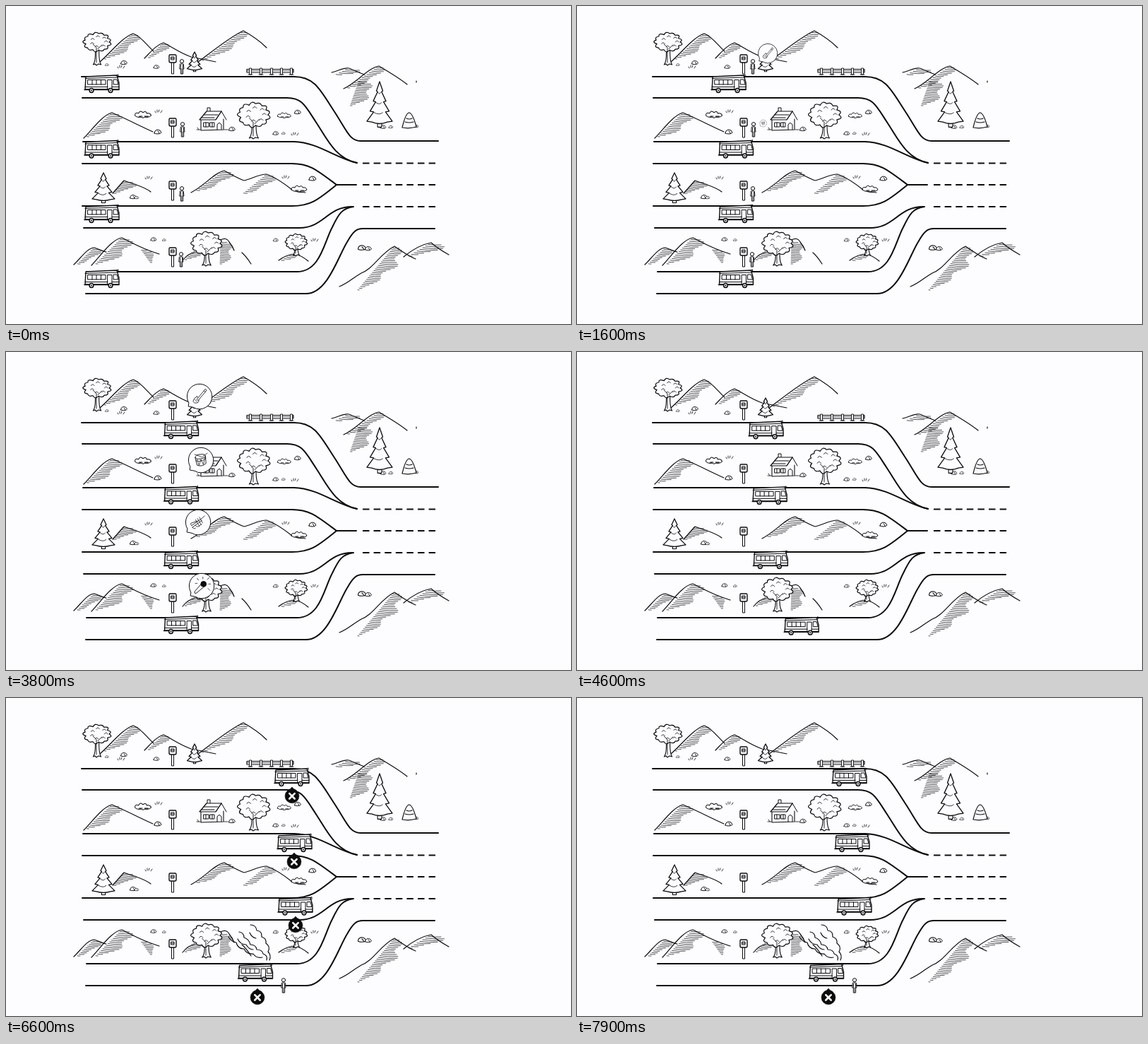
An HTML page with a canvas for the animation above (8 s loop, 800 by 450 pixels).

```html
<!DOCTYPE html>
<html lang="en">
<head>
<meta charset="utf-8">
<title>Four buses</title>
<style>
html, body { margin: 0; width: 100%; height: 100%; overflow: hidden; background: #fdfcff; }
canvas { display: block; }
</style>
</head>
<body>
<canvas id="stage" width="800" height="450"></canvas>
<script>
const g = document.getElementById('stage').getContext('2d');
const PAPER = '#fdfcff', INK = '#0c0c0c', LOOP = 8000;

const clamp = u => Math.max(0, Math.min(1, u));
const mix = (a, b, u) => a + (b - a) * u;
const span = (t, from, length) => clamp((t - from) / length);
const easeOut = u => 1 - (1 - u) ** 2;
const easeInOut = u => u < .5 ? 2 * u * u : 1 - 2 * (1 - u) ** 2;

function ink(d, width = 1, fill) {
  const path = new Path2D(d);
  if (fill) { g.fillStyle = fill; g.fill(path); }
  g.lineWidth = width;
  g.stroke(path);
}
function at(x, y, scale, draw) {
  if (scale <= 0) return;
  g.save();
  g.translate(x, y);
  g.scale(scale, scale);
  draw();
  g.restore();
}
function disc(x, y, r, fill, width = 1) {
  g.beginPath();
  g.arc(x, y, r, 0, 7);
  g.fillStyle = fill;
  g.fill();
  g.lineWidth = width;
  g.stroke();
}

// Scenery
function shade(x, y, footX, footY, w) {
  const n = Math.round((footY - y) / 2.5);
  let d = '';
  for (let i = 1; i <= n; i++) {
    const u = i / (n + .5);
    const len = w * Math.sin(Math.PI * u ** .8) ** .7 * (.78 + .22 * Math.sin(i * 7));
    d += `M${mix(x, footX, u)} ${mix(y, footY, u)}q${len / 2} ${len * .08} ${len} ${len * .04}`;
  }
  ink(d, .7);
}
function tree(x, y, rx, ry, base) {
  const k = rx / 20, top = y + ry * .5;
  ink(`M${x - 3 * k} ${top}Q${x - 1.5 * k} ${base - 5} ${x - 6 * k} ${base}l${3 * k} -1l${2 * k} 2l${3 * k} -2l${4 * k} 1Q${x + 2 * k} ${base - 5} ${x + 3 * k} ${top}`, 1.1, PAPER);
  const n = 13;
  const spot = (i, r) => {
    const a = i / n * 2 * Math.PI, f = r * (1 + .05 * Math.sin(i * 4));
    return `${x + rx * f * Math.cos(a)} ${y + ry * f * Math.sin(a)}`;
  };
  let d = 'M' + spot(0, .9);
  for (let i = 1; i < n; i++) d += `Q${spot(i - .5, 1.22)} ${spot(i, .9)}`;
  ink(d + `Q${spot(n - .5, 1.22)} ${spot(0, .9)}Z`, 1.2, PAPER);
  for (let i = 0; i < 7; i++) ink(`M${spot(i * 1.9, .55)}q${2 * k} ${-4 * k} ${5 * k} 0`, .8);
  ink(`M${x - 1} ${base - 3}L${x - 1} ${y + ry * .6}l${-5 * k} ${-5 * k}M${x + 1} ${y + ry * .75}l${6 * k} ${-6 * k}`, .9);
}
function pine(x, y, w, h) {
  ink(`M${x - w * .08} ${y + h * .85}v${h * .14}h${w * .16}v${-h * .14}`, 1.1, PAPER);
  const left = [], right = [];
  for (let i = 1; i <= 4; i++) {
    const half = w * i / 8, level = y + h * .88 * i / 4;
    for (const [f, lift] of [[1, 1], [.62, 0]]) {
      left.push(`${x - half * f} ${level - lift}`);
      right.unshift(`${x + half * f} ${level - lift}`);
    }
  }
  ink(`M${x} ${y}L${left.join('L')}Q${x} ${y + h * .95} ${right.join('L')}Z`, 1.3, PAPER);
  for (let i = 1; i < 4; i++) ink(`M${x - w * i / 14} ${y + h * .22 * i + 1}q${w * i / 14} 4 ${w * i / 9} 0`, .8);
}
function rock(x, y, w) {
  at(x, y, w / 10, () => ink('M-5 2Q-5-2-1-3Q4-3 5 1Q4 3 0 3Q-4 3-5 2ZM0-1q2 1 2 3', 1, PAPER));
}
function bush(x, y, w) {
  at(x, y, w / 22, () => ink('M-11 0q0-5 5-3q2-5 6-1q4-3 5 1q5-1 6 3q-3 3-8 2q-3 2-6 0q-5 1-8-2ZM-5 1h4M2 1h5', 1, PAPER));
}
const grass = (x, y) => ink(`M${x - 5} ${y}l1 2M${x - 2} ${y - 2}v3M${x + 1} ${y - 2}l-1 3M${x + 5} ${y - 1}l-2 3`, .8);
function sign(x, y) {
  at(x, y, 1, () => {
    ink('M-1.5 11V27H1.5V11', 1, PAPER);
    ink('M-4 0H4Q5 0 5 2V9Q5 11 3 11H-3Q-5 11-5 9V2Q-5 0-4 0Z', 1.4, PAPER);
    ink('M-2 3h4v4h-4zM-2 5h4', 1);
  });
}
function house() {
  ink('M285 151V144H289V150', 1, PAPER);
  ink('M276 160V176L308 175V160', 1.1, PAPER);
  ink('M284 149H305L297 161H274Z', 1.2, PAPER);
  ink('M305 149L312 161M305 149L297 161M277 158h18M280 154h20', 1);
  ink('M299 175V168Q302 163 305 168V175M280 165h7v6h-7zM289 165h6v6h-6zM283 165v6M292 165v6', 1);
  ink('M270 175h5M271 172l2 3M309 175h5', .8);
}
function fence() {
  ink('M341 89.5H407V94H341Z', 1.1, PAPER);
  ink('M341 91.5H407', .6);
  for (const x of [346, 361, 376, 390, 404]) ink(`M${x - 1} 88h2.5v9h-2.5zM${x - 3} 97h6`, .9, PAPER);
}

const ridges = [
  'M133 79C148 66 165 44 180 39C190 42 200 56 209 64',
  'M196 74C205 65 213 55 223 52C232 56 245 66 262 72L297 79',
  'M271 80C290 66 315 45 336 35C345 40 358 48 369 59',
  'M461 94C470 92 478 87 485 88C492 90 500 95 508 97',
  'M478 117C495 110 512 88 528 85C540 92 558 103 568 111M581 106v2',
  'M110 187C120 178 135 155 150 151C165 157 190 170 208 178',
  'M151 265L167 247C180 252 195 255 205 263',
  'M262 264C280 255 295 236 309 233C318 238 328 244 337 247C347 245 358 238 369 238C380 242 395 252 405 260C412 264 416 263 424 264',
  'M96 366C105 358 115 342 125 342C131 344 137 347 142 348',
  'M121 367C135 352 150 330 164 328C175 333 190 343 217 351',
  'M250 360Q258 350 268 348M302 332Q312 326 316 334Q321 340 323 346',
  'M334 349Q340 354 347 365M386 360Q398 351 410 351Q418 353 428 361',
  'M472 397C485 392 492 384 503 378C520 372 530 350 550 340C560 347 570 354 580 358',
  'M563 355C575 345 590 337 602 335C610 342 618 347 627 352'
];
const shades = [
  [180, 39, 138, 76, 22], [223, 52, 200, 74, 16], [336, 35, 276, 78, 20], [485, 88, 465, 98, 25],
  [528, 85, 482, 117, 20], [500, 105, 487, 142, 27], [150, 151, 113, 186, 27], [167, 247, 151, 266, 24],
  [309, 233, 268, 262, 26], [369, 238, 335, 266, 24], [125, 342, 100, 366, 18], [164, 328, 126, 366, 30],
  [190, 343, 205, 364, 14], [268, 346, 252, 360, 15], [304, 332, 303, 366, 20], [405, 351, 388, 361, 12],
  [550, 340, 497, 403, 27], [602, 335, 568, 355, 30]
];
const roads = [
  'M107 100H408C438 100 446 121 464 148C482 175 486 191 502 191H612',
  'M108 130H398C420 130 424 142 440 166C455 189 467 216 497 222',
  'M109 192H408C442 193 466 215 497 222',
  'M108 223H405C430 223 440 232 468 253H496',
  'M108 283H405C430 283 440 276 468 253',
  'M110 314H415C450 314 455 284 490 284',
  'M114 376H412C445 376 450 335 462 313C471 294 476 286 492 284',
  'M113 407H425C455 407 470 355 483 334C492 318 497 315 505 315H607'
];

function scenery() {
  ridges.forEach(d => ink(d, 1.2));
  shades.forEach(s => shade(...s));
  [[167, 80, 9], [143, 83, 5], [213, 86, 8], [215, 178, 10], [320, 174, 9], [382, 180, 8], [393, 180, 5],
   [413, 150, 9], [434, 244, 10], [180, 270, 9], [185, 271, 6], [209, 330, 8], [224, 331, 5], [382, 331, 7],
   [504, 342, 11], [513, 343, 9], [534, 171, 8], [545, 171, 6], [581, 170, 6]].forEach(r => rock(...r));
  [[194, 155, 23], [394, 156, 19], [415, 260, 22]].forEach(b => bush(...b));
  [[216, 149], [202, 243], [396, 242], [437, 331], [163, 86], [409, 181]].forEach(p => grass(...p));
  tree(129, 51, 19, 13, 83);
  tree(351, 154, 22, 17, 187);
  tree(284, 336, 21, 16, 367);
  tree(411, 334, 15, 11, 353);
  pine(267, 65, 21, 28);
  pine(529, 107, 36, 65);
  pine(138, 236, 32, 43);
  ink('M561 172Q566 151 571 151Q576 152 581 171Q571 174 561 172ZM567 159q4 2 8 0M565 164q6 2 12 0', 1.2, PAPER);
  house();
  fence();
  [[236, 69], [236, 159], [236, 248], [236, 342]].forEach(p => sign(...p));
  roads.forEach(d => ink(d, 2));
  g.setLineDash([9.5, 6.1]);
  g.lineCap = 'butt';
  for (const y of [222.5, 253, 284]) ink(`M505 ${y}H608`, 2);
  g.setLineDash([]);
  g.lineCap = 'round';
}

// Moving parts
const bus = () => {
  ink('M2 3L46 1L49 12V21H1Z', 1.4, PAPER);
  ink('M1 5.5L47 4', 1);
  ink('M5 7.5H30V14H5ZM11 7.5V14M17 7.5V14M23.5 7.5V14M33 7.5H39V21H33ZM41.5 7H46L48 14H41.5ZM1 17.5H33M39 17.5H49M46 1l2-1v3', 1);
  ink('M0 21.5H49', 1.5);
  for (const x of [10, 37]) {
    disc(x, 22.5, 2.9, PAPER, 1.5);
    disc(x, 22.5, .8, INK, .5);
  }
};
const person = () => {
  ink('M-2.3 7H2.3L3 14H1.7V21H-1.7V14H-3ZM0 14V21M-1.5 8.5V14M1.5 8.5V14', .9, PAPER);
  disc(0, 3.2, 2.6, PAPER, 1);
};

const icons = [
  () => {
    ink('M-4 0Q-9 2-10 7Q-9 11-5 10Q-1 10-1 5Q1 2-1 1Q-2 3-4 0Z', .9, PAPER);
    ink('M-4 4L7-9L9-7L-2 6ZM7-9L9-12L11-10L9-7M-7 5l3 3', .9, PAPER);
  },
  () => {
    ink('M-9-4L-6 8Q2 11 8 5L7-7', 1, PAPER);
    ink('M-9-4Q-8-9-1-9Q6-10 7-7Q6-3-1-2Q-8-1-9-4Z', 1, PAPER);
    ink('M-6-1L-3 8L0-1L4 7L6-4M-8 1Q0 4 8-3M-10-9L1-5M10-11L2-5', .8);
  },
  () => {
    ink('M-10 5L7-7L10-10M-9 8L6-3M-10 5Q-14 2-10 1L-1-2M-9 8Q-5 12-4 9', .9);
    ink('M-4-4l6 10M-1-6l6 10M2-8l5 9M-4 5q3 5 9-2', .8);
  },
  () => {
    ink('M0-3L4 1L-9 12Q-12 12-11 9Z', 1, PAPER);
    disc(3, -3, 4.3, INK);
    ink('M-5-9l-2-3M2-11v-3M9-10l3-3M11-3h3M10 4l3 3M-7-4h-3', .8);
  }
];
function bubble(i) {
  g.beginPath();
  g.arc(17, -18, 17.7, 2.62, 2.1 + 2 * Math.PI);
  g.lineTo(1.5, -4);
  g.closePath();
  g.fillStyle = PAPER;
  g.fill();
  g.lineWidth = 1;
  g.stroke();
  at(17, -18, .9, icons[i]);
}
const marker = () => {
  ink('M-6 4.5Q-2 3 0 0Q2 3 6 4.5Z', .5, INK);
  disc(0, 12.8, 10, INK, .5);
  g.strokeStyle = '#fff';
  ink('M-3.7 9.1l7.4 7.4M3.7 9.1l-7.4 7.4', 2.6);
  g.strokeStyle = INK;
};

const puff = 'M1 0q3-6-2-10q4-6-2-11q2-7-5-8q1-9-9-11q-9-1-9 6q-7 3-3 9q-4 4 2 5q3 6 10 4q4 5 9 4q6 2 4 8q3 2 3 4';
const plume = 'M2 0q3-7-2-12q4-7-3-12q1-7-6-9q1-8-7-9q-1-8-9-8'
  + 'M-2 0q2-7-5-9q-1-6-9-6q-1-7-9-7q-2-8-9-10q0-7-7-8'
  + 'M-8-4q-8 2-13-5q-9 1-13-7q-9 0-11-9q-7-1-11-8M-43-30q4 8 12 8q4 7 10 7M-26-39q3 7 9 8';

function smoke(t) {
  if (t < 5700) at(371, 371, easeOut(span(t, 5000, 550)), () => ink(puff, 1.1, PAPER));
  else at(371, 371, mix(.65, 1, easeOut(span(t, 5650, 600))), () => ink(plume, 1.2));
}

function markerScale(t, start) {
  const grow = 1.36 * easeOut(span(t, start, 200));
  return grow - .36 * easeInOut(span(t, start + 200, 250));
}

const lanes = [
  { y: 97, drop: 2, arrive: 985, leave: 4350, end: 380, back: 19, who: [249, 75], talk: [257, 81], mark: [405, 126] },
  { y: 189.5, drop: 2.5, arrive: 920, leave: 4323, end: 384, back: 19, who: [250, 164], talk: [259, 171], mark: [408, 219] },
  { y: 281, drop: .5, arrive: 920, leave: 4317, end: 385, back: 17, who: [249, 255], talk: [255, 259], mark: [410, 309] },
  { y: 373, drop: 2.5, arrive: 920, leave: 4010, end: 328.5, back: 0, who: [248, 348], talk: [260, 349], mark: [356, 411] }
];

function draw(t) {
  g.fillStyle = PAPER;
  g.fillRect(0, 0, 800, 450);
  g.strokeStyle = INK;
  g.lineCap = g.lineJoin = 'round';
  scenery();
  smoke(t);

  lanes.forEach((lane, i) => {
    const board = easeInOut(span(t, 3000 + i * 80, 400));
    if (board < 1) at(lane.who[0] + 5 * board, lane.who[1] + 26 * board, 1, person);
  });
  const exit = easeOut(span(t, 5950, 600));
  if (exit) at(mix(364, 393, exit), mix(378, 396, exit), 1, person);

  lanes.forEach(lane => {
    const go = easeInOut(span(t, lane.leave, 1000));
    const x = mix(111, 223.5, easeInOut(span(t, lane.arrive, 1000))) + (lane.end - 223.5) * go
      - lane.back * span(t, 7370, 530) ** 2;
    at(x, lane.y + lane.drop * go, 1, bus);
  });

  lanes.forEach((lane, i) => {
    const size = easeOut(span(t, 1390 + i * 150, 400)) - easeInOut(span(t, 3850 + i * 60, 300));
    at(...lane.talk, size, () => bubble(i));
    const last = i === 3;
    const pop = markerScale(t, last ? 5400 : 5800 + i * 100);
    at(...lane.mark, last ? pop : pop * (1 - span(t, 7000, 250)), marker);
  });
}

function frame(now) {
  draw(Math.floor(now % LOOP / 100) * 100);
  requestAnimationFrame(frame);
}
requestAnimationFrame(frame);
</script>
</body>
</html>
```
